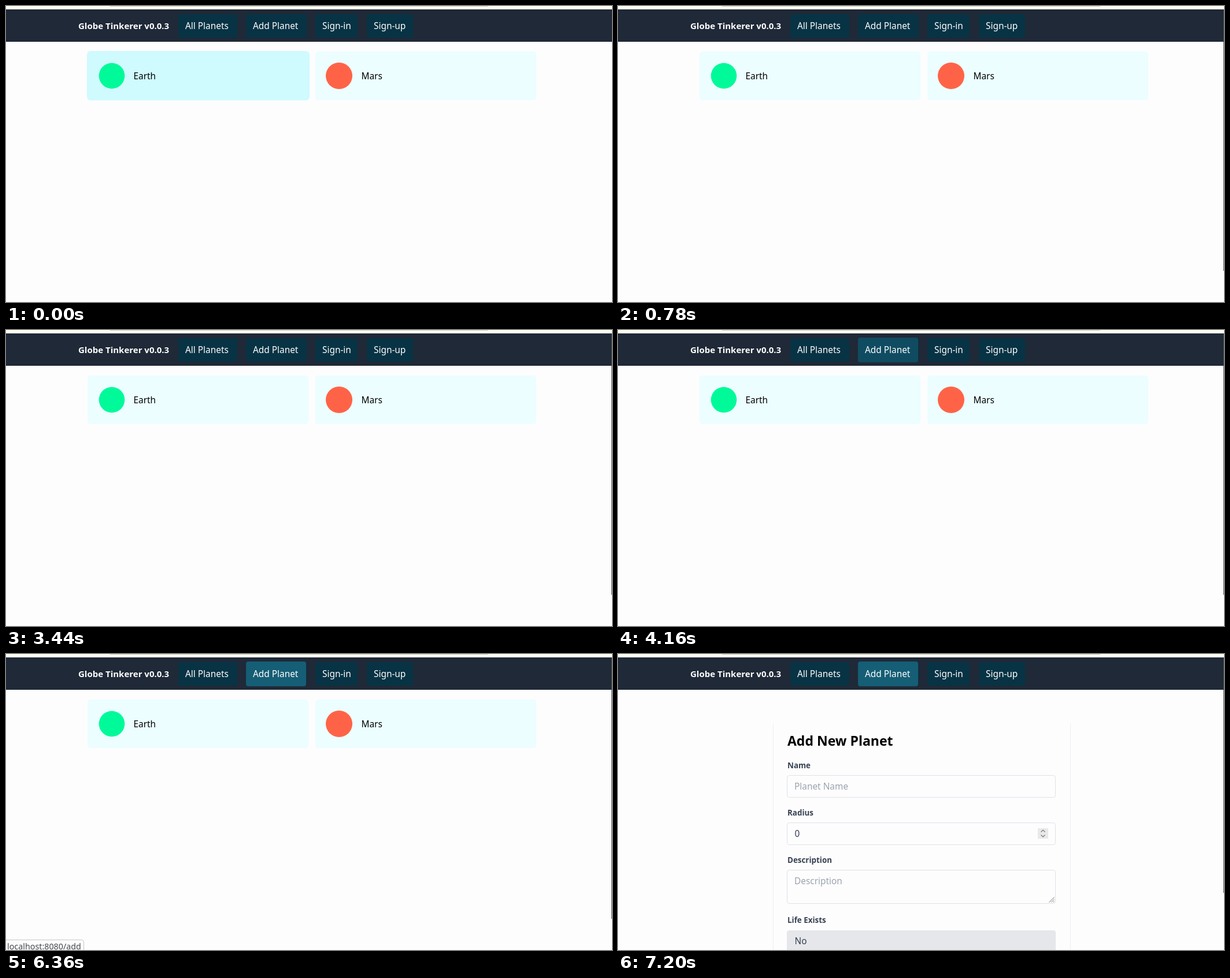
These frames come from a looping animation (1048x513 px, 8000 ms). An HTML page:

```html
<!DOCTYPE html>
<html lang="en">
<head>
<meta charset="utf-8">
<title>Globe Tinkerer</title>
<style>
  html, body { margin: 0; width: 100%; height: 100%; overflow: hidden; background: #fdfdfe; }
  svg { display: block; width: 100%; height: 100%; }
  text { font: 15.4px "Noto Sans", sans-serif; }
  .brand { font-size: 15px; font-weight: 700; }
  .title { font-size: 23px; font-weight: 700; }
  .label { font-size: 13.4px; font-weight: 700; fill: #374151; }
  .status text { font-size: 14.3px; fill: #45474d; }
  .hint { fill: #9ca3af; }
  .value { fill: #374151; }
  .nav text { fill: #fff; }
  .button { fill: #083344; }
  .card { fill: #ecfeff; }
  .field { fill: #fdfdfe; stroke: #e0e1e8; }

  .timed { animation: 8s step-end infinite; }
  .card-hover { animation-name: card-hover; }
  .button-hover { animation-name: button-hover; }
  .status { animation-name: status; }
  .planets { animation-name: planets; }
  .form { animation-name: form; }
  .edge { animation-name: edge; }

  @keyframes card-hover {
    0% { opacity: 1; }
    6.25% { opacity: .4; }
    7.75% { opacity: 0; }
    34% { opacity: 1; }
    43%, 100% { opacity: 0; }
  }
  @keyframes button-hover {
    0% { opacity: 0; }
    52% { opacity: .6; }
    53.3%, 100% { opacity: 1; }
  }
  @keyframes status {
    0% { opacity: 0; }
    54.6% { opacity: .4; }
    55.9% { opacity: .75; }
    57.2% { opacity: 1; }
    88.5% { opacity: .5; }
    90%, 100% { opacity: 0; }
  }
  @keyframes planets {
    0% { opacity: 1; }
    87%, 100% { opacity: 0; }
  }
  @keyframes form {
    0% { opacity: 0; }
    87%, 100% { opacity: 1; }
  }
  @keyframes edge {
    0% { opacity: 0; height: 453px; }
    6.25% { opacity: 1; height: 453px; }
    87%, 100% { opacity: 1; height: 408px; }
  }
</style>
</head>
<body>
<svg viewBox="0 0 1048 513" preserveAspectRatio="none">
  <rect width="1048" height="513" fill="#fdfdfe"/>
  <rect width="1048" height="6" fill="#fefef0"/>
  <rect x="180" width="654" height="1" fill="#c8c8c4"/>
  <rect y="5" width="1048" height="1" fill="#e3e3dc"/>

  <g class="nav">
    <rect y="6" width="1048" height="56" fill="#1f2937"/>
    <text class="brand" x="125" y="40">Globe Tinkerer v0.0.3</text>
    <g class="button">
      <rect x="298" y="14" width="102" height="41" rx="4"/>
      <rect x="415" y="14" width="105" height="41" rx="4"/>
      <rect x="535" y="14" width="73" height="41" rx="4"/>
      <rect x="624" y="14" width="80" height="41" rx="4"/>
    </g>
    <rect class="timed button-hover" x="415" y="13" width="104" height="43" rx="4" fill="#155e75"/>
    <text x="310" y="40">All Planets</text>
    <text x="427" y="40">Add Planet</text>
    <text x="547" y="40">Sign-in</text>
    <text x="636" y="40">Sign-up</text>
  </g>

  <g class="timed planets">
    <rect class="card" x="141" y="79" width="382" height="84" rx="5"/>
    <rect class="card" x="535" y="79" width="382" height="84" rx="5"/>
    <rect class="timed card-hover" x="140" y="78" width="385" height="85.5" rx="6" fill="#cffafe"/>
    <circle cx="183" cy="121" r="22.3" fill="#00fa9a"/>
    <circle cx="576" cy="121" r="23" fill="#ff6347"/>
    <text x="220.5" y="127">Earth</text>
    <text x="614.5" y="127">Mars</text>
  </g>

  <g class="timed form">
    <path d="M268.5 513V120M782.5 513V120" stroke="#f0f0f4"/>
    <text class="title" x="293" y="159">Add New Planet</text>

    <text class="label" x="293" y="198">Name</text>
    <rect class="field" x="292.5" y="210.5" width="464" height="38" rx="4"/>
    <text class="hint" x="305" y="235">Planet Name</text>

    <text class="label" x="293" y="280">Radius</text>
    <rect class="field" x="292.5" y="292.5" width="464" height="38" rx="4"/>
    <text class="value" x="305.5" y="317">0</text>
    <rect x="726" y="302" width="18" height="18" fill="#e9e9ea"/>
    <path d="M731.5 308.5l3.5-3.5 3.5 3.5M731.5 313.5l3.5 3.5 3.5-3.5" fill="none" stroke="#777" stroke-width="1.2"/>

    <text class="label" x="293" y="362">Description</text>
    <rect class="field" x="292.5" y="374.5" width="464" height="58" rx="4"/>
    <text class="hint" x="305" y="399">Description</text>
    <path d="M745.5 430.5l9-9M749 430.5l5.5-5.5M752.5 430.5l2-2" stroke="#777"/>

    <text class="label" x="293" y="466">Life Exists</text>
    <rect x="292" y="479" width="465" height="40" rx="4" fill="#e5e7eb"/>
    <text class="value" x="305.5" y="503">No</text>
  </g>

  <g class="timed status">
    <path d="M-1 495.5H131a3.5 3.5 0 0 1 3.5 3.5V515H-1z" fill="#fdfdfd" stroke="#c6c6c8"/>
    <text x="2" y="512">localhost:8080/add</text>
  </g>

  <rect class="timed edge" x="1047" y="6" width="1" height="453" fill="#555"/>
</svg>
</body>
</html>
```
